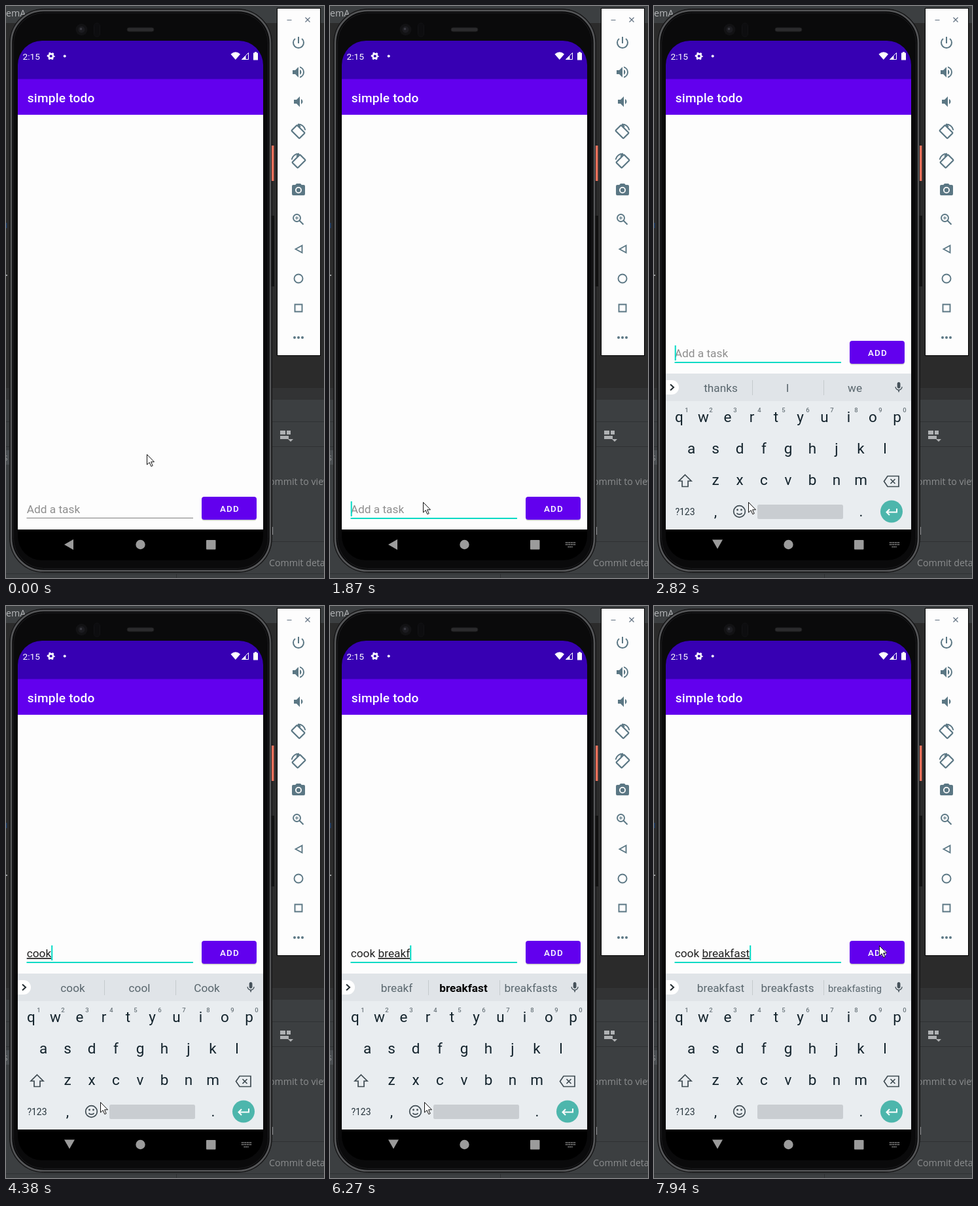
These frames come from a looping animation (486x873 px, 8000 ms). An HTML page:

```html
<!DOCTYPE html>
<html lang="en">
<head>
<meta charset="utf-8">
<title>Simple todo</title>
<style>
html, body { margin: 0; width: 100%; height: 100%; overflow: hidden; background: #3c3f41; }
svg { display: block; width: 486px; height: 873px; font-family: Roboto, sans-serif; }
.ide { font: 14.2px "Open Sans", "Noto Sans", sans-serif; fill: #8b8d8e; }
.mid { text-anchor: middle; }
.key { font-size: 22.5px; fill: #13232c; text-anchor: middle; }
.num { font-size: 9.5px; font-weight: 500; fill: #6a757b; text-anchor: middle; }
.line { fill: none; stroke: #5b7784; stroke-width: 1.9; }
.word { text-decoration: underline; text-decoration-thickness: 1px; }
</style>
</head>
<body>
<svg viewBox="0 0 486 873">
  <defs>
    <clipPath id="screen"><rect x="18" y="53" width="375" height="793" rx="37"/></clipPath>
    <clipPath id="app"><rect x="18" y="166" width="375" height="633"/></clipPath>
  </defs>

  <!-- editor behind the phone -->
  <rect width="486" height="873" fill="#3c3f41"/>
  <path d="M0 26H486V583H0z" fill="#2b2b2b"/>
  <path d="M0 583H486V601H0z" fill="#323334"/>
  <path d="M0 634.5H486M0 672.5H486M400 817.5H486M0 866.5H486M260.5 866V873" stroke="#2f3133"/>
  <path d="M0 678H5V700H0z" fill="#4b4f52"/>
  <path d="M0 331H1.500V339H0z" fill="#1f3f6b"/>
  <path d="M0 410H2V412H0zM406.500 795H408V807H406.500z" fill="#a0a2a4"/>
  <g class="ide">
    <text x="0" y="16" fill="#b5b7b9">emA</text>
    <text x="-4" y="694">s</text>
    <text x="402" y="731">ommit to view</text>
    <text x="402" y="855">Commit details</text>
  </g>
  <path d="M419 648h8v6h-8zM429 648h6v6h-6zM419 656h13v5h-13zM431 661h8l-4 4z" fill="#afb1b3"/>

  <!-- phone body -->
  <rect x="5.500" y="4.500" width="401" height="860" rx="52" fill="#161617" stroke="#161617"/>
  <rect x="8" y="7" width="396" height="855" rx="49.500" fill="#09090a" stroke="#555658" stroke-width="2.600"/>
  <rect x="11.500" y="10.500" width="389" height="848" rx="46" fill="#0a0a0b" stroke="#1d1d1f"/>
  <path d="M406 213h3.500v54H406z" fill="#e9705b"/>
  <path d="M405.500 320h4.500v108h-4.500z" fill="#111"/>
  <circle cx="115.500" cy="36" r="9" fill="#121214"/>
  <circle cx="115.500" cy="36" r="5" fill="#1c1c20"/>
  <circle cx="114.500" cy="35" r="1.800" fill="#3c3c44"/>
  <rect x="134.500" y="26" width="9" height="21" rx="4.500" fill="#0d0d0f" stroke="#131315"/>
  <rect x="185" y="33" width="41" height="6" rx="3" fill="#2b2b2d" stroke="#1b1b1c"/>

  <g clip-path="url(#screen)">
    <path d="M18 53H393V846H18z"/>
    <path d="M18 53H393V112H18z" fill="#3700b3"/>
    <path d="M18 111.500H393V166H18z" fill="#6200ee"/>
    <path d="M18 166H393V799H18z" fill="#fdfdfd"/>
    <g fill="#fff">
      <text x="25.500" y="82" font-size="13.700">2:15</text>
      <g fill="none" stroke="#fff">
        <circle cx="68.700" cy="76.500" r="3.400" stroke-width="2.600"/>
        <circle cx="68.700" cy="76.500" r="5" stroke-width="2" stroke-dasharray="2.618" stroke-dashoffset="1.300"/>
      </g>
      <circle cx="89.700" cy="76.500" r="2"/>
      <path d="M343.500 73.500Q351 67 358 73.500L350.800 82z"/>
      <path d="M370.500 71.500V81.500H360.500zM366 76.500V81" stroke="#fff" fill="none"/>
      <path d="M366 76V82H360z"/>
      <path d="M380 70h3v1.500h2V82.500h-7V71.500h2z"/>
      <text x="32.800" y="147" font-size="19.100" font-weight="500" letter-spacing=".2">simple todo</text>
    </g>

    <g clip-path="url(#app)">
      <g id="form">
        <rect id="rule" x="31.500" y="781" width="254.500"/>
        <text id="field" x="31.700" y="774" font-size="17.300"></text>
        <rect id="caret" y="756" width="2" height="23" fill="#03dac5"/>
        <rect x="299" y="750.500" width="84" height="35" rx="4" opacity=".2"/>
        <rect x="299" y="749" width="84" height="35" rx="4" fill="#6200ee"/>
        <text x="327" y="772" font-size="13.400" font-weight="500" letter-spacing="1.200" fill="#fff">ADD</text>
      </g>
      <g id="board">
        <path d="M18 561H393V799H18z" fill="#e9edf0"/>
        <path d="M18 561H393V603H18z" fill="#e0e4e8"/>
        <path d="M18 571H27a11 11 0 0 1 0 22H18z" fill="#fff"/>
        <path d="M25 577.500l5 4.500-5 4.500" fill="none" stroke="#222b30" stroke-width="2"/>
        <path d="M150.500 571V594M259.500 571V594" stroke="#c5cacd"/>
        <path transform="translate(364.500 572.500) scale(.8)" fill="#46525a" d="M12 14c1.660 0 3-1.340 3-3V5c0-1.660-1.340-3-3-3S9 3.340 9 5v6c0 1.660 1.340 3 3 3zm5.300-3c0 3-2.540 5.100-5.300 5.100S6.700 14 6.700 11H5c0 3.410 2.720 6.230 6 6.720V21h2v-3.280c3.280-.48 6-3.300 6-6.720z"/>
        <g id="words" class="mid" font-size="17.200"></g>
        <g id="keys"></g>
        <g fill="none" stroke="#3f4b52" stroke-width="1.700">
          <path d="M47.500 715.500L57 725H52V733.500H43V725H38z"/>
          <path d="M357 717.500H374V733.500H357L351.500 725.500zM361.500 722l7 7M368.500 722l-7 7"/>
          <circle cx="130.500" cy="771.500" r="8.800"/>
          <path d="M126.500 774a4.500 3.500 0 0 0 8 0"/>
        </g>
        <g fill="#3f4b52"><circle cx="127.500" cy="769" r="1.400"/><circle cx="133.500" cy="769" r="1.400"/></g>
        <text class="mid" x="47.500" y="777" font-size="14" fill="#26343c">?123</text>
        <rect x="158" y="761" width="131" height="22" rx="2.500" fill="#c9cdd1"/>
        <circle cx="363" cy="771.500" r="17" fill="#4db6ac"/>
        <path d="M371 767v5.500H356M360 768l-4.500 4.500 4.500 4.500" fill="none" stroke="#fff" stroke-width="2"/>
      </g>
    </g>

    <g fill="#9b9b9b">
      <path id="back" d="M89 822L103 814V830z"/>
      <circle cx="205.500" cy="822" r="7.200"/>
      <rect x="306" y="815" width="14.500" height="14.500" rx="1"/>
      <path id="ime" d="M360 819H375M360 822H375M363.500 825.500H371.500" stroke="#9b9b9b" stroke-width="1.500" stroke-dasharray="1.800 .84"/>
    </g>
  </g>

  <!-- emulator tool panel -->
  <rect x="414.500" y="3.500" width="66" height="530" fill="#fdfdfd" stroke="#000"/>
  <path d="M429.500 21.500h7M457.500 17.500l7 7M464.500 17.500l-7 7" stroke="#607080" stroke-width="1.200"/>
  <g id="tools" fill="#5b7784"></g>

  <path id="mouse" d="M.5 .5V16l3.700-3.400 2.600 6 2.400-1-2.600-5.800H11.500z" fill="#fff" stroke="#111" stroke-width="1"/>
</svg>
<script>
const $ = id => document.getElementById(id);
const HINT = "Add a task", LEFT = 31.7, SIZE = 17.2;

const letter = (c, x, y) => `<text class="key" x="${x}" y="${y}">${c}</text>`;
const row = (chars, x, y) => [...chars].map((c, i) => letter(c, x + 37 * i, y)).join("");
$("keys").innerHTML = row("qwertyuiop", 38.5, 635) + row("asdfghjkl", 57, 683) + row("zxcvbnm", 94, 731) +
  letter(",", 94, 779) + letter(".", 316.5, 779) +
  [..."1234567890"].map((c, i) => `<text class="num" x="${50 + 37 * i}" y="620">${c}</text>`).join("");

const turn = side => `<g class="line" transform="translate(12 12) scale(${side} 1)">
  <rect x="-8.500" y="-6" width="17" height="12" rx="1" transform="translate(-.5 1) rotate(45)" stroke-width="2.200"/>
  <path d="M-1-10.500Q8-10.500 10.500-1.500M-1-10.500l4 4"/></g>`;
const tools = [
  `<path d="M13 3h-2v10h2zm4.830 2.170l-1.420 1.420A7 7 0 1 1 7.580 6.580L6.170 5.170a9 9 0 1 0 11.660 0z"/>`,
  `<path d="M3 9v6h4l5 5V4L7 9zm13.500 3a4.500 4.500 0 0 0-2.500-4v8a4.500 4.500 0 0 0 2.500-4zM14 3.230v2.060a7 7 0 0 1 0 13.420v2.060a9 9 0 0 0 0-17.540z"/>`,
  `<path d="M18.500 12a4.500 4.500 0 0 0-2.500-4v8a4.500 4.500 0 0 0 2.500-4zM5 9v6h4l5 5V4L9 9z"/>`,
  turn(1), turn(-1),
  `<circle cx="12" cy="12" r="3.200"/><path fill-rule="evenodd" d="M9 2L7.170 4H4a2 2 0 0 0-2 2v12a2 2 0 0 0 2 2h16a2 2 0 0 0 2-2V6a2 2 0 0 0-2-2h-3.170L15 2zM7 12a5 5 0 1 1 10 0a5 5 0 1 1-10 0z"/>`,
  `<g class="line"><circle cx="9.500" cy="9.500" r="5.500"/><path d="M13.500 13.500l6 6"/><path d="M7 9.500h5M9.500 7v5" stroke-width="1.200"/></g>`,
  `<path class="line" d="M7.500 12L17.500 6.500V17.500z"/>`,
  `<circle class="line" cx="12" cy="12" r="6.500"/>`,
  `<path class="line" d="M6.500 6.500H17.500V17.500H6.500z"/>`,
  `<circle cx="6" cy="12" r="2"/><circle cx="12" cy="12" r="2"/><circle cx="18" cy="12" r="2"/>`
];
$("tools").innerHTML = tools.map((t, i) => `<g transform="translate(435 ${44 + 45 * i})">${t}</g>`).join("");

// time, pointer x, pointer y
const moves = [
  [0, 215, 684], [120, 200, 703], [240, 176, 722], [360, 162, 729], [510, 160, 729], [660, 159, 728],
  [810, 159, 727], [930, 159, 751], [1080, 153, 754], [1200, 146, 755], [1320, 142, 757], [2430, 144, 757],
  [7420, 166, 728], [7540, 222, 652], [7670, 292, 552], [7790, 336, 496], [7940, 344, 518]
];
// time, finished text, word being typed
const typing = [
  [0, "", ""], [3350, "", "c"], [3640, "", "coo"], [4380, "", "cook"], [4950, "cook ", ""],
  [5230, "cook ", "b"], [5350, "cook ", "br"], [5470, "cook ", "bre"], [5590, "cook ", "brea"],
  [5710, "cook ", "break"], [6270, "cook ", "breakf"], [6550, "cook ", "breakfa"], [6700, "cook ", "breakfast"]
];
// time, suggestions; * marks the bold one
const hints = [
  [0, "thanks I we"], [3490, "c can could"], [3640, "coo cool cook"], [4380, "cook cool Cook"],
  [4950, "for and the"], [5230, "b by be"], [5350, "br *breakfast be"], [5470, "bre *breakfast bread"],
  [5590, "brea *breakfast break"], [5710, "break *breakfast breaking"], [6270, "breakf *breakfast breakfasts"],
  [6550, "breakfa *breakfast breakfasts"], [6700, "breakfast breakfasts breakfasting"]
];
const caretOff = [[0, 1720], [2290, 2820], [4230, 4380], [7280, 7790]];

const at = (list, t) => list.findLast(e => e[0] <= t);
const show = (id, on) => $(id).setAttribute("visibility", on ? "visible" : "hidden");
const move = (id, value) => $(id).setAttribute("transform", value);

function showField(done, word) {
  const field = $("field"), empty = !(done + word);
  const text = done.replace(" ", "\u00a0");
  field.setAttribute("fill", empty ? "#8e8e8e" : "#202020");
  field.innerHTML = empty ? HINT : `${text}<tspan class="word">${word}</tspan>`;
  $("caret").setAttribute("x", LEFT + (empty ? 0 : field.getComputedTextLength()));
}

function showWords(line) {
  $("words").innerHTML = line.split(" ").map((w, i) => {
    const style = w[0] == "*" ? 'fill="#000" font-weight="700"' : 'fill="#59666d"';
    return `<text x="${[102, 204, 307][i]}" y="589" ${style}>${w.replace("*", "")}</text>`;
  }).join("");
  for (const el of $("words").children) {
    const w = el.getComputedTextLength();
    if (w > 82) el.setAttribute("font-size", SIZE * 82 / w);
  }
}

function draw() {
  const t = performance.now() % 8000;
  const focus = t >= 1720, raised = t >= 1990, settled = t >= 2140;
  const [, x, y] = at(moves, t);
  move("mouse", `translate(${x} ${y})`);
  move("form", `translate(0 ${raised ? -238 : 0})`);
  move("board", `translate(0 ${settled ? 0 : 60})`);
  $("board").setAttribute("opacity", settled ? 1 : .7);
  show("board", raised);
  move("back", `rotate(${settled ? -90 : raised ? -50 : 0} 96.3 821.3)`);
  show("ime", t >= 1870);
  $("rule").setAttribute("height", focus ? 2 : 1);
  $("rule").setAttribute("fill", focus ? "#03dac5" : "#7d7d7d");
  show("caret", !caretOff.some(([a, b]) => t >= a && t < b));
  const [, done, word] = at(typing, t);
  showField(done, word);
  showWords(at(hints, t)[1]);
  requestAnimationFrame(draw);
}
draw();
</script>
</body>
</html>
```
